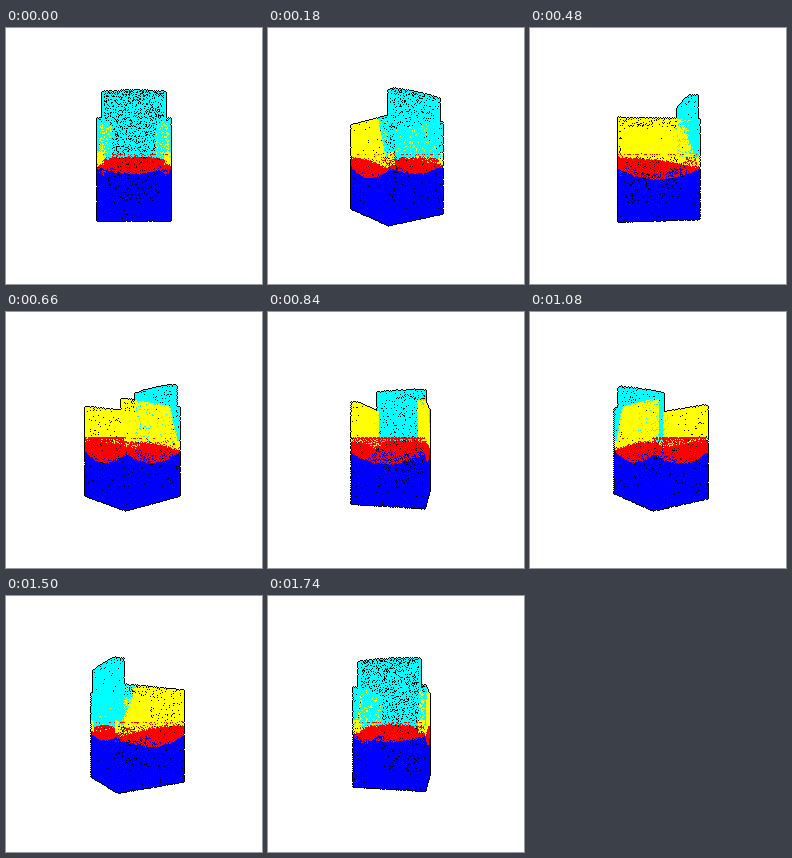
Recreate the animation shown at these times as an HTML page with a canvas. Size 256x256 px, loop 1.8 s.

```html
<!DOCTYPE html>
<html lang="en">
<head>
<meta charset="utf-8">
<title>Armchair point cloud</title>
<style>
html, body { margin: 0; width: 100%; height: 100%; overflow: hidden; background: #fff; }
canvas { display: block; width: 256px; height: 256px; }
</style>
</head>
<body>
<canvas id="stage" width="256" height="256"></canvas>
<script>
const SIZE = 256, MID_X = 127.6, MID_Y = 128, CAMERA = 222;
const STEP_MS = 60, STEPS = 30;

// Packed as ABGR
const BLACK = 0xff000000, RED = 0xff0000ff, BLUE = 0xffff0000;
const YELLOW = 0xff00ffff, CYAN = 0xffffff00;

// Chair measures: x is width, y is up, z points to the rear
const W = 31.3, FRONT = -37, REAR = 33, FLOOR = -54.7, ARM = 32.5, SEAT = 1.7;
const BACK_W = 27, BACK_TOP = 56, BACK_IN = 26, ARM_IN = 26;

let seed = 7;
function random() {
  seed = (seed * 1664525 + 1013904223) >>> 0;
  return seed / 4294967296;
}
const mix = (a, b, t) => a + (b - a) * t;

const points = [];
const add = (x, y, z, paint) => points.push({ x, y, z, color: paint(x, y, z) });

// Scatter points over a flat box
function scatter(x0, x1, y0, y1, z0, z1, density, paint) {
  const dims = [x1 - x0, y1 - y0, z1 - z0].map(Math.abs).filter(d => d > 0);
  const count = Math.round(dims[0] * dims[1] * density);
  for (let i = 0; i < count; i++) {
    add(mix(x0, x1, random()), mix(y0, y1, random()), mix(z0, z1, random()), paint);
  }
}

function edge(a, b, paint, gap = 2) {
  const n = Math.round(Math.hypot(b[0] - a[0], b[1] - a[1], b[2] - a[2]) / gap);
  for (let i = 0; i <= n; i++) {
    add(...a.map((v, k) => mix(v, b[k], i / n)), paint);
  }
}

const yellow = () => YELLOW, cyan = () => CYAN, red = () => RED, blue = () => BLUE;

function paintSide(x, y, z) {
  const t = (z - FRONT) / (REAR - FRONT);
  const fuzz = random() - 0.5;
  if (y < -11 - 9 * Math.sin(Math.PI * t) + fuzz) return BLUE;
  if (y < -1 - 9 * t * t + 2 * fuzz) return RED;
  const wedge = 17 + 12 * (ARM - y) / 33;
  return y > -1 && z > wedge + 3 * fuzz ? CYAN : YELLOW;
}

function paintRear(x, y) {
  const t = Math.abs(x) / W;
  const fuzz = random() - 0.5;
  if (y < -9 - 6 * Math.cos(t * Math.PI / 2) + fuzz) return BLUE;
  if (t > 0.82 && y < 4 && y > -7) return YELLOW;
  return y < -4 * t * t + 2 * fuzz ? RED : CYAN;
}

function paintFront(x, y) {
  const fuzz = random() - 0.5;
  if (y < -11 - 9 * Math.cos(x / W * Math.PI / 2) + fuzz) return BLUE;
  return y > 3 ? YELLOW : RED;
}

// The backrest is slightly crowned
const crown = x => BACK_TOP - 1.2 * (x / BACK_W) ** 2;

function build() {
  // Body, floor and seat
  scatter(-W, W, FLOOR, 2, REAR, REAR, 1.15, paintRear);
  scatter(-W, W, FLOOR, 2, FRONT, FRONT, 1.15, paintFront);
  scatter(-W, W, FLOOR, FLOOR, FRONT, REAR, 1, blue);
  scatter(-W, W, SEAT, SEAT, FRONT, REAR, 0.3, red);

  for (const s of [-1, 1]) {
    const x = s * W, inner = s * ARM_IN, back = s * BACK_W, top = crown(BACK_W);
    scatter(x, x, FLOOR, 2, FRONT, REAR, 1.15, paintSide);
    // Arm
    scatter(x, x, 2, ARM, FRONT, REAR, 1.2, paintSide);
    scatter(inner, inner, 0, ARM, FRONT, BACK_IN, 1.2, yellow);
    scatter(inner, x, 2, ARM, FRONT, FRONT, 1.5, yellow);
    edge([x, ARM, FRONT], [x, ARM, REAR], paintSide);
    edge([inner, ARM, FRONT], [inner, ARM, BACK_IN], yellow);
    edge([inner, ARM, FRONT], [x, ARM, FRONT], yellow);
    edge([x, ARM, REAR], [back, ARM, REAR], cyan);
    // Side of the backrest
    scatter(back, back, ARM - 4, top, BACK_IN, REAR, 1.5, cyan);
    edge([back, ARM, REAR], [back, top, REAR], cyan);
    edge([back, ARM, BACK_IN], [back, top, BACK_IN], cyan);
    edge([back, top, BACK_IN], [back, top, REAR], cyan);
    // Body outline
    edge([x, FLOOR, FRONT], [x, FLOOR, REAR], blue);
    edge([x, FLOOR, FRONT], [x, ARM, FRONT], paintSide);
    edge([x, FLOOR, REAR], [x, ARM, REAR], paintRear);
  }
  edge([-W, FLOOR, REAR], [W, FLOOR, REAR], blue);
  edge([-W, FLOOR, FRONT], [W, FLOOR, FRONT], blue);
  edge([-W, 2.5, FRONT], [W, 2.5, FRONT], red, 1.2);

  // Backrest: flat outside, bulging cushion inside
  scatter(-W, W, 2, ARM, REAR, REAR, 1.1, paintRear);
  for (let i = 0; i < 1250; i++) {
    const x = mix(-BACK_W, BACK_W, random());
    add(x, mix(ARM, crown(x), random()), REAR, cyan);
  }
  for (let i = 0; i < 2900; i++) {
    const x = mix(-BACK_W, BACK_W, random()), y = mix(0, crown(x), random());
    const bulge = 5 * (1 - (x / BACK_W) ** 2) * Math.min(1, (BACK_TOP - y) / 6);
    add(x, y, BACK_IN - bulge, cyan);
  }
  for (let x = -BACK_W; x <= BACK_W; x += 2) add(x, crown(x), REAR, cyan);
}
build();

const ctx = document.getElementById("stage").getContext("2d");
const image = ctx.createImageData(SIZE, SIZE);
const pixels = new Uint32Array(image.data.buffer);
const depth = new Float32Array(SIZE * SIZE);
const HALO = [-1, 1, -SIZE, SIZE];

function plot(i, z, color) {
  if (z > depth[i]) {
    depth[i] = z;
    pixels[i] = color;
  }
}

// Points are single pixels; their dark halo lies behind every surface
function draw(angle) {
  const c = Math.cos(angle), s = Math.sin(angle);
  pixels.fill(0xffffffff);
  depth.fill(-Infinity);
  for (const p of points) {
    const z = p.z * c - p.x * s;
    const scale = CAMERA / (CAMERA - z);
    const px = Math.round(MID_X + (p.x * c + p.z * s) * scale);
    const py = Math.round(MID_Y - p.y * scale);
    const i = py * SIZE + px;
    plot(i, z, p.color);
    for (const step of HALO) plot(i + step, -CAMERA, BLACK);
  }
  ctx.putImageData(image, 0, 0);
}

let shown = -1;
function tick() {
  const step = Math.floor(performance.now() / STEP_MS) % STEPS;
  if (step !== shown) {
    shown = step;
    draw(step * 2 * Math.PI / STEPS);
  }
  requestAnimationFrame(tick);
}
tick();
</script>
</body>
</html>
```
